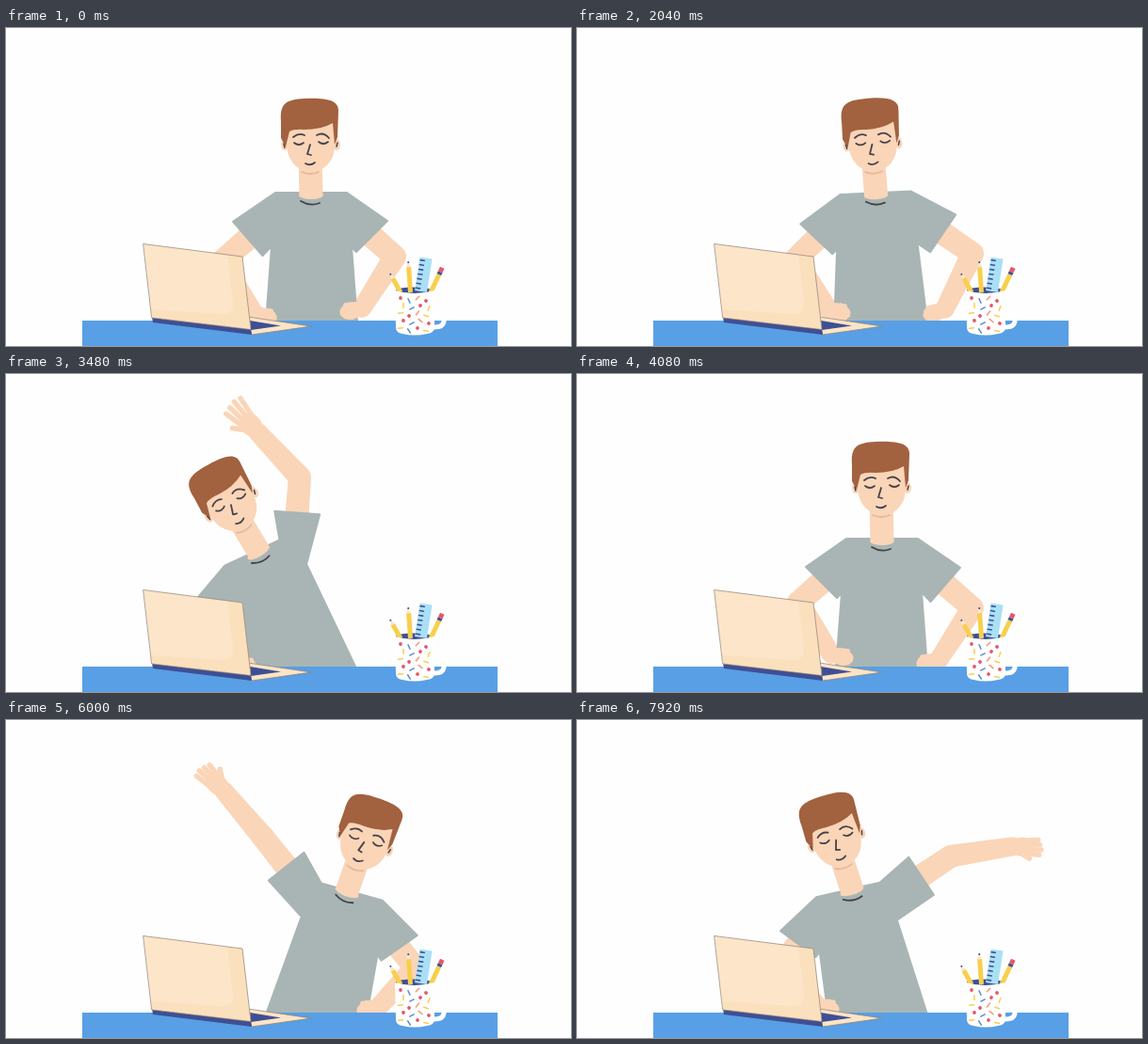
These frames come from a looping animation (600x338 px, 8 s). An HTML page with a canvas:

```html
<!DOCTYPE html>
<html lang="en">
<head>
<meta charset="utf-8">
<title>Desk stretch</title>
<style>
  html, body { margin: 0; height: 100%; overflow: hidden; background: #fefefe; }
  canvas { display: block; width: 100vw; height: 100vh; }
</style>
</head>
<body>
<canvas id="stage" width="600" height="338"></canvas>
<script>
const ctx = document.getElementById('stage').getContext('2d');
const SKIN = '#fad5b8', SHIRT = '#a9b5b4', HAIR = '#a2613f', INK = '#45434a', OUTLINE = '#8d7e73';
const NAVY = '#3f4f93', BLUE = '#589fe5', YELLOW = '#f8cf4d', RED = '#e4586b';
const LOOP = 8000, STEP = 120;
const STRETCH = 1980, CYCLE = 5640; // right stretch, left stretch, rest
const UPPER_ARM = 82, SLEEVE = 44, FOREARM = 66, HIP = [324, 311];

const clamp = v => Math.max(0, Math.min(1, v));
const add = (a, b) => [a[0] + b[0], a[1] + b[1]];
const middle = (a, b) => [(a[0] + b[0]) / 2, (a[1] + b[1]) / 2];
const radians = degrees => degrees * Math.PI / 180;
function turn([x, y], degrees) {
  const c = Math.cos(radians(degrees)), s = Math.sin(radians(degrees));
  return [x * c - y * s, x * s + y * c];
}
const ray = (length, degrees) => turn([length, 0], degrees);

function paint(d, fill, stroke, width = 1) {
  const path = new Path2D(d);
  if (fill) { ctx.fillStyle = fill; ctx.fill(path); }
  if (stroke) { ctx.strokeStyle = stroke; ctx.lineWidth = width; ctx.stroke(path); }
}
const line = (d, color, width) => paint(d, null, color, width);
const poly = (points, ...style) => paint('M' + points.map(p => p.join()).join('L') + 'Z', ...style);
const box = (x, y, w, h, fill) => paint(`M${x} ${y}h${w}v${h}h${-w}Z`, fill);
function disc(x, y, rx, ry = rx, fill = SKIN) {
  ctx.fillStyle = fill;
  ctx.beginPath();
  ctx.ellipse(x, y, rx, ry, 0, 0, 7);
  ctx.fill();
}
function placed([x, y], degrees, draw) {
  ctx.save();
  ctx.translate(x, y);
  ctx.rotate(radians(degrees));
  draw();
  ctx.restore();
}

function limb(base, elbow, wrist) {
  const joints = [[...base, 12.5], [...elbow, 12], [...wrist, 10]];
  joints.forEach(([x, y, r], i) => {
    disc(x, y, r);
    if (!i) return;
    const [px, py, pr] = joints[i - 1];
    const a = Math.atan2(y - py, x - px) + Math.PI / 2, c = Math.cos(a), s = Math.sin(a);
    poly([[px + c * pr, py + s * pr], [x + c * r, y + s * r],
      [x - c * r, y - s * r], [px - c * pr, py - s * pr]], SKIN);
  });
}

function hand(wrist, degrees, open, thumbSide) {
  placed(wrist, degrees, () => {
    disc(10, 0, 14, 9 + 2 * open);
    for (let i = -1.5; i < 2; i++) {
      const tip = 21 + 20 * open - Math.abs(i + .4) * 2;
      line(`M12 ${i * 4.5}L${tip} ${i * (3 + 4.6 * open)}`, SKIN, 5.4);
    }
    line(`M6 ${5 * thumbSide}L${16 + 5 * open} ${thumbSide * (7 + 10 * open)}`, SKIN, 5.5);
  });
}

function head(center, degrees) {
  placed(center, degrees, () => {
    line('M-9 40Q0 44 9 40', '#e8b7a0', 1.8);
    disc(-27, 11, 4, 6);
    disc(28, 11, 4, 6);
    paint('M-26-12L26-12L26 12C26 30 13 40 1 40C-12 40-24 29-25 12Z', SKIN);
    paint('M-31-14C-32-32-27-37-6-38C18-39 31-36 30-24L29 3L26 11L24-12Q12-5-6-5Q-17-6-22-3L-26 13L-31 4Z', HAIR);
    line('M-18 3Q-12-2-6 1M7 1Q14-3 20 4', INK, 1.8);
    line('M-17 9Q-12 13-7 9M9 8Q14 12 19 8', INK, 1.7);
    line('M0 11L-3 21L1 22M-5 31Q0 34 5 30', INK, 1.8);
    line('M-28 10L-27 14M29 9L28 13', INK, 1.5);
  });
}

// Posed as a lean to the right; side -1 mirrors it. The face is never mirrored.
function person(lean, reach, side, bob) {
  const bend = 28 * lean, tilt = 32 * lean;
  const raise = Math.sin(reach * Math.PI / 2) ** 2, lift = raise ** .8;
  const onTrunk = (x, y) => add(HIP, turn([x, y], bend));

  const upperAngle = 139 + 130 * lift, foreAngle = 57 + 264 * raise;
  const joint = onTrunk(-34, -116);
  const cuff = add(joint, ray(SLEEVE, upperAngle));
  const elbow = add(joint, ray(UPPER_ARM, upperAngle));
  const wrist = add(elbow, ray(FOREARM, foreAngle));
  const cuffTop = add(cuff, ray(24, upperAngle + 90)), cuffBottom = add(cuff, ray(24, upperAngle - 90));
  const shoulder = add(onTrunk(-38, -136), [11 * lift, 5 * lift]);
  const armpit = add(onTrunk(-42, -79), [10 * lift, -20 * lift]);

  const farShoulder = onTrunk(38, -136);
  const onSleeve = (x, y) => add(farShoulder, turn([x, y], bend * .6));
  const farTop = onSleeve(43, 30), farBottom = onSleeve(10, 63), farArmpit = onSleeve(5, 58);
  const farElbow = [413 + 36 * lean, 243 + 34 * lean];
  const farWrist = [378 + 30 * lean, 298 + 11 * lean];

  ctx.save();
  if (side < 0) { ctx.translate(2 * HIP[0], 0); ctx.scale(-1, 1); }
  limb(cuff, elbow, wrist);
  limb(middle(farTop, farBottom), farElbow, farWrist);
  poly([shoulder, cuffTop, cuffBottom, armpit, [276, 313], [373 + 17 * lean, 313],
    farArmpit, farBottom, farTop, farShoulder], SHIRT, SHIRT, 2);
  hand(wrist, foreAngle - 44 * (1 - raise) ** 2, raise, raise > .55 ? 1 : -1);
  hand(farWrist, 167, 0, 1);
  ctx.restore();

  const flip = ([x, y]) => [side < 0 ? 2 * HIP[0] - x : x, y];
  const collar = onTrunk(0, -129);
  const center = add(collar, turn([0, -69 - 5 * lean], tilt));
  const neck = flip(collar), face = add(flip(center), [-1, bob]);
  const jaw = add(face, turn([0, 20], tilt * side));
  placed(neck, tilt * side, () => {
    disc(0, -4, 12.5, 4);
    line('M-11 2Q-1 8 9 4', INK, 1.8);
  });
  ctx.lineCap = 'butt';
  line(`M${jaw}L${add(neck, [0, -3])}`, SKIN, 25);
  ctx.lineCap = 'round';
  head(face, tilt * side);
}

function laptop() {
  const lid = [[146, 229.5], [251, 243], [260, 320.5], [155, 308]];
  poly([[257, 307], [324, 317], [261, 326]], '#fce4c6', OUTLINE, .7);
  poly([[259, 311], [292, 316.5], [260, 321]], NAVY);
  poly([[155, 307], [260, 320], [261, 326], [156, 313]], NAVY);
  poly(lid, '#fde5c9');
  paint('M235 241L251 243L260 320L155 308L154 299L229 304Q242 304 241 292Z', '#fbe0bd');
  poly(lid, null, OUTLINE, .7);
}

function pencil(x, degrees, length, eraser) {
  placed([x, 281], degrees, () => {
    box(-2.5, -length, 5, length, YELLOW);
    if (eraser) {
      box(-2.5, -length - 3, 5, 3, NAVY);
      box(-2.5, -length - 8, 5, 5, RED);
    } else {
      poly([[-2.5, -length], [2.5, -length], [0, -length - 6]], '#fbe6cd');
      disc(0, -length - 5, 1, 1, NAVY);
    }
  });
}

function mug() {
  disc(433, 279, 19, 3.5, NAVY);
  pencil(419, -29, 17);
  pencil(429.5, -4, 27);
  placed([440, 280], 9, () => {
    box(-6, -36, 13, 36, '#a9e0f5');
    for (let y = -33; y < 0; y += 5) line(`M-5 ${y}h4`, NAVY, 1.6);
  });
  pencil(451, 25, 21, true);
  line('M453 306H460Q466 306 465 312Q464 318 455 318', '#fff', 5);
  paint('M413 279Q434 285 455 279V318Q455 324 447 325Q434 328 421 325Q414 324 414 318Z', '#fff');
  const dashes = [YELLOW, '#5b8bd4', '#f29a78'];
  for (let i = 0; i < 20; i++) {
    const row = i >> 2, spot = [419 + i % 4 * 9 + row % 2 * 3, 287 + row * 8 + i % 2 * 3];
    placed(spot, i * 67, () => i % 3 ? line('M-2.5 0H2.5', dashes[i % 4 % 3], 1.5) : disc(0, 0, 1.9, 1.9, RED));
  }
}

function draw(time) {
  const t = Math.floor(time % LOOP / STEP) * STEP;
  const phase = t % CYCLE, resting = phase >= 2 * STRETCH;
  const q = phase % STRETCH;
  // Each stretch goes up, eases off halfway, pulls again and comes down.
  const swing = resting ? 0 : Math.min(1, q / 600, (STRETCH - q) / 540);
  const ease = resting ? 0 : Math.sin(clamp((q - 600) / 840) * Math.PI) ** 2;
  const breath = (phase - 2 * STRETCH - STEP) / 1040 * 2 * Math.PI;
  const bob = resting ? -1.5 - 1.5 * Math.cos(breath) : 0;

  box(0, 0, 600, 338, '#fefefe');
  ctx.lineCap = ctx.lineJoin = 'round';
  person(swing - .38 * ease, swing - .28 * ease, phase < STRETCH ? 1 : -1, bob);
  box(81, 311, 441, 27, BLUE);
  laptop();
  mug();
}

const begin = performance.now();
function frame() {
  draw(performance.now() - begin);
  requestAnimationFrame(frame);
}
frame();
</script>
</body>
</html>
```
